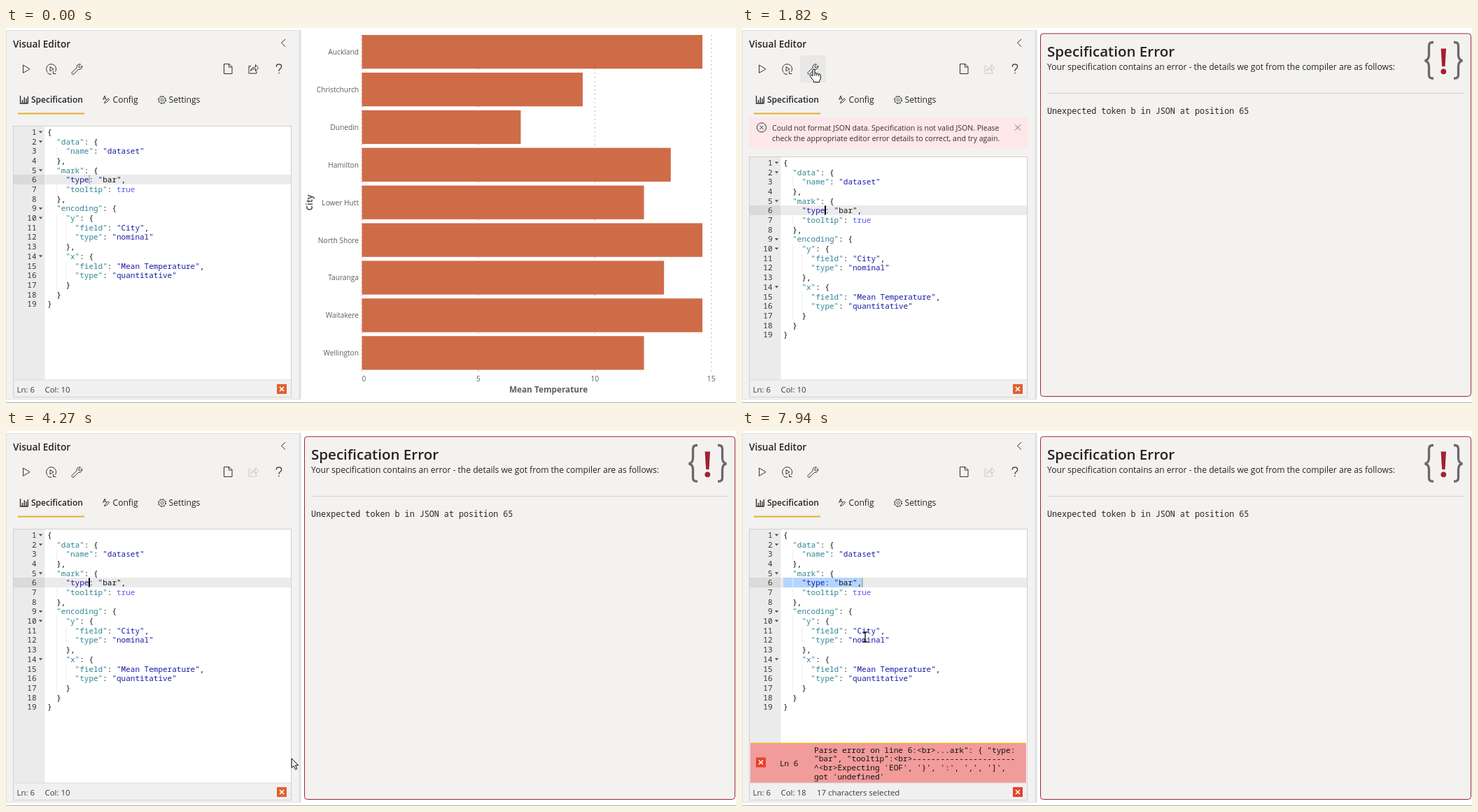
Write an HTML page that moves like this. It is 1043 px wide and 537 px high and loops after 7.99 s.

```html
<!DOCTYPE html>
<html lang="en">
<head>
<meta charset="utf-8">
<title>Visual Editor</title>
<style>
  html, body { margin: 0; width: 100%; height: 100%; overflow: hidden; background: #fff; }
  svg { display: block; width: 1043px; height: 537px; }
  text { font: 12.1px "Open Sans", "Noto Sans", sans-serif; fill: #252423; white-space: pre; }
  .semi { font-weight: 600; }
  .small { font-size: 10.55px; fill: #323130; }
  .status { font-size: 11.4px; fill: #3b3a39; }
  .axis { font-size: 10.2px; fill: #605e5c; }
  .axisTitle { font-size: 11.8px; font-weight: 700; fill: #605e5c; }
  .mono { font-family: "Noto Sans Mono", "DejaVu Sans Mono", monospace; font-size: 11px; fill: #111; }
  .key { fill: #318495; }
  .str { fill: #1a1aa6; }
  .const { fill: #585cf6; }
  .end { text-anchor: end; }
  .mid { text-anchor: middle; }
  .icon { fill: none; stroke: #323130; stroke-width: 1; }
</style>
</head>
<body>
<svg id="stage" viewBox="0 0 1043 537"></svg>
<script>
const LOOP = 7990, ROW = 13.68, CHAR = 6.6, CODE_X = 59, BANNER_SHIFT = 44;

const esc = s => s.replace(/&/g, '&amp;').replace(/</g, '&lt;');
const text = (x, y, s, cls = '', more = '') =>
  `<text x="${x}" y="${y}" class="${cls}" ${more}>${esc(s)}</text>`;
const rect = (x, y, w, h, fill, more = '') =>
  `<rect x="${x}" y="${y}" width="${w}" height="${h}" fill="${fill}" ${more}/>`;
const path = (d, more = 'class="icon"') => `<path d="${d}" ${more}/>`;
const group = (id, body) => `<g id="${id}">${body}</g>`;
const errorBox = (x, y, id = '') =>
  rect(x, y, 14, 14, '#e8402a', `id="${id}"`) +
  path(`M${x + 4} ${y + 4}l6 6m0-6l-6 6`, 'stroke="#fff" stroke-width="1.7"');

// Chart
const cities = [['Auckland', 14.62], ['Christchurch', 9.48], ['Dunedin', 6.82], ['Hamilton', 13.26],
  ['Lower Hutt', 12.11], ['North Shore', 14.62], ['Tauranga', 12.97], ['Waitakere', 14.62], ['Wellington', 12.11]];
const scaleX = v => 508.5 + v * 33.28;

function chart() {
  const grid = [0, 5, 10, 15].map(v =>
    path(`M${scaleX(v)} 10V494`, 'stroke="#b3b0ad" stroke-width="1.2" stroke-dasharray="1.5 4.5"') +
    text(v ? scaleX(v) : 511.5, 505.5, String(v), 'axis mid')).join('');
  const bars = cities.map(([name, v], i) => {
    const y = 10 + i * 53.9;
    return rect(508.5, y, scaleX(v) - 508.5, 48.3, '#cf6c48') + text(504, y + 28, name, 'axis end');
  }).join('');
  return grid + bars + text(775, 521.5, 'Mean Temperature', 'axisTitle mid') +
    text(0, 0, 'City', 'axisTitle mid', 'transform="translate(437.5 250) rotate(-90)"');
}

function errorPage() {
  const brace = 'M988 20.5h-1.5q-5 0-5 5v13q0 7.5-6 8.3q6 .8 6 8.3v12q0 5 5 5h1.5';
  const braceStyle = 'fill="none" stroke="#6b6967" stroke-width="3.3"';
  return rect(426.5, 8, 615, 519.5, '#f3f2f1', 'rx="4" stroke="#9c262c"') +
    text(436, 41, 'Specification Error', 'semi', 'style="font-size:20.55px"') +
    text(436, 60, 'Your specification contains an error - the details we got from the compiler are as follows:') +
    rect(436, 93, 596, 1, '#d2d0ce') +
    text(436, 123, 'Unexpected token b in JSON at position 65', 'mono', 'style="font-size:11.72px;fill:#252423"') +
    path(brace, braceStyle) +
    path(brace, braceStyle + ' transform="matrix(-1 0 0 1 2005 0)"') +
    path('M998.6 29.5h7.4l-1.5 25.5h-4.4z', 'fill="#a4202c"') +
    '<circle cx="1002.3" cy="62.3" r="3.9" fill="#a4202c"/>';
}

// Left panel
function toolbar() {
  const gear = '<circle cx="223" cy="103" r="5.6" class="icon" stroke-dasharray="2.2 2.2"/>' +
    '<circle cx="223" cy="103" r="4.6" class="icon" style="stroke-width:.8"/>' +
    '<circle cx="223" cy="103" r="2" class="icon" style="stroke-width:.8"/>';
  return text(10, 28, 'Visual Editor', 'semi', 'style="font-size:13.6px"') +
    path('M399 16l-5.5 5.3l5.5 5.3') +
    rect(83, 39, 37, 39, '#e9e8e7', 'id="hover"') +
    path('M24.5 53l9.5 5.7l-9.5 5.7z') +
    path('M59.5 63.5a7 7 0 1 1 11-1M71.5 65.5h-4v-4M59.5 64.8a7 7 0 0 0 5.5 1.4M63 55.5l5 3.2l-5 3.2z') +
    path('M94.5 63.3l6.7-6.5a4 4 0 0 1 5.3-4.8l-2.6 2.6l.3 1.7l1.7.3l2.6-2.6a4 4 0 0 1-4.9 5.2l-6.6 6.7a1.8 1.8 0 0 1-2.5-2.6z') +
    path('M311.5 51.5h7.5l4 4v10h-11.5zM318.5 51.5v4.5h4.5') +
    path('M350 54.5h-3v10.5h11v-3M349.5 61.5q1-5.5 7-5.5v-3.5l4 4.7l-4 4.7v-3.5q-4.5-.5-7 3.1z', 'class="icon" id="share"') +
    path('M386.2 55.5q0-3.6 3.7-3.6t3.7 3.4q0 2-1.9 3.2t-1.8 3.3M389.9 63.7v1.6', 'class="icon" style="stroke-width:1.3"') +
    path('M20.5 97v11h11M23.5 108v-5M26.3 108v-9M29 108v-7M31.3 108v-10', 'class="icon" style="stroke-width:1.4"') +
    text(36, 107, 'Specification', 'semi', 'style="font-size:12px"') +
    path('M138.5 103l2.5-6l2.3 5.5M139.5 101h3M140.5 107.5l1.2-2.6l4.5-4l1.5 1.6l-4.5 4.2z') +
    text(152.5, 107, 'Config') + gear + text(232.5, 107, 'Settings') +
    rect(17, 121.5, 95, 2, '#e8b02a');
}

function banner() {
  return rect(10, 128, 399, 43.5, '#fde7e9') +
    group('bannerText',
      '<circle cx="28" cy="142.5" r="6.6" class="icon"/>' + path('M25.4 139.9l5.2 5.2m0-5.2l-5.2 5.2') +
      text(43, 147, 'Could not format JSON data. Specification is not valid JSON. Please', 'small') +
      text(43, 162, 'check the appropriate editor error details to correct, and try again.', 'small') +
      path('M390 138.5l8 8m0-8l-8 8', 'stroke="#605e5c" stroke-width=".9"'));
}

const code = `{
  "data": {
    "name": "dataset"
  },
  "mark": {
    "type: "bar",
    "tooltip": true
  },
  "encoding": {
    "y": {
      "field": "City",
      "type": "nominal"
    },
    "x": {
      "field": "Mean Temperature",
      "type": "quantitative"
    }
  }
}`.split('\n');

const paint = line => line.includes('"type: ')
  ? line.replace('"type: "', '<tspan class="str">$&</tspan>')
  : line.replace(/"[^"]*"(?=:)|"[^"]*"|true/g, (s, at) => {
      const cls = s === 'true' ? 'const' : line[at + s.length] === ':' ? 'key' : 'str';
      return `<tspan class="${cls}">${s}</tspan>`;
    });

function codeLines() {
  const top = 210;
  let out = rect(11, top, 44, 14, '#dadada') + rect(55, top, 352, 14, '#ebebeb') +
    rect(CODE_X, top, 113, 14, '#b5d5ff', 'id="selection"');
  code.forEach((line, i) => {
    const y = 153 + i * ROW, indent = line.search(/\S/);
    out += text(43.5, y, String(i + 1), 'mono end', 'style="fill:#333"');
    if (line.endsWith('{')) out += path(`M46.8 ${y - 5.5}h5.4l-2.7 3.2z`, 'fill="#555"');
    for (let c = 2; c < indent; c += 2)
      out += rect(CODE_X + c * CHAR, y - 11, 1, ROW, '#eee');
    out += `<text x="${CODE_X}" y="${y}" class="mono">${paint(line)}</text>`;
  });
  return out + rect(118, top + 0.5, 2, 13, '#000', 'id="caret"');
}

function parsePanel() {
  const message = ['Parse error on line 6:<br>...ark": { "type:', '"bar", "tooltip":<br>' + '-'.repeat(22),
    "^<br>Expecting 'EOF', '}', ':', ',', ']',", "got 'undefined'"];
  return rect(12, 446.5, 394, 1.5, '#f0b429') + rect(12, 448, 394, 56, '#f29b9b') + errorBox(20, 467.5) +
    text(54, 479.5, 'Ln 6', 'mono') +
    message.map((s, i) => text(103, 460.7 + i * 12.7, s, 'mono', 'style="font-size:11.15px"')).join('');
}

const pointers = {
  arrow: path('M0 0v13.5l3.1-2.9l2.3 5.3l2.3-1l-2.3-5.1h4.2z', 'fill="#fff" stroke="#000"'),
  beam: path('M-3.5-7h2.5q1 0 1 1v12q0 1-1 1h-2.5M3.5-7h-2.5q-1 0-1 1M0 6q0 1 1 1h2.5', 'fill="none" stroke="#111" stroke-width="1.3"'),
  hand: path('M-1.5 1.5q1.5-2.6 3 0v5q1.5-1.2 2.8.3q1.5-.8 2.7.7q2.3-.6 2.7 1.5v4.5q0 2-1.5 3.5v2h-8.2v-1.8l-5-6.3q-.8-1.9 1-2.3q1.3 0 2.5 1.8z' +
    'M1.5 6.5v3.5M4.3 7v3M7 8v2.3', 'fill="#fff" stroke="#000" stroke-linejoin="round"')
};

const stage = document.getElementById('stage');
stage.innerHTML =
  group('chart', chart()) + group('errorPage', errorPage()) +
  rect(0, 3, 421.5, 529, '#e1e0df') + rect(1, 4, 417.5, 527, '#f3f2f1') +
  rect(0, 536, 1043, 1, '#b0afae') + toolbar() + group('banner', banner()) +
  rect(10.5, 140.5, 397, 388, '#fff', 'stroke="#d0cfce" id="frame"') +
  rect(11, 141, 44.5, 363, '#ebebeb', 'id="gutter"') +
  group('lines', codeLines()) + group('panel', parsePanel()) +
  rect(11, 504, 396, 24, '#f0f0f0') + rect(11, 503.5, 396, 1, '#dcdcdc') +
  text(15.5, 521.5, 'Ln: 6', 'status') + text(55.5, 521.5, 'Col: 10', 'status', 'id="col"') +
  text(107, 521.5, '17 characters selected', 'status', 'id="count"') + errorBox(387, 510, 'badge') +
  group('pointer', Object.entries(pointers).map(([k, v]) => group(k, v)).join(''));

const $ = {};
stage.querySelectorAll('[id]').forEach(el => $[el.id] = el);
const show = (el, on) => el.style.display = on ? '' : 'none';
const set = (el, attrs) => Object.entries(attrs).forEach(([k, v]) => el.setAttribute(k, v));

// Pointer stops: time, x, y, sideways bend on the way there
const stops = [[500, 300, 548], [920, 102.5, 58.5], [2430, 102.5, 58.5], [3210, 394, 141], [3370, 394, 141],
  [3560, 397, 147], [3740, 397, 147], [4430, 397, 519, 27], [4740, 397, 519], [5350, 378, 490],
  [5480, 378, 490], [5900, 326, 387], [7520, 326, 387], [7620, 326, 411, 15], [7780, 326, 411], [7940, 176, 295]];

function pointerAt(t) {
  const i = stops.findIndex(s => s[0] > t);
  if (i < 1) return (i ? stops[stops.length - 1] : stops[0]).slice(1);
  const [t0, x0, y0] = stops[i - 1], [t1, x1, y1, bend = 0] = stops[i];
  const u = (t - t0) / (t1 - t0), e = u * u * (3 - 2 * u);
  return [x0 + (x1 - x0) * e + bend * Math.sin(Math.PI * e), y0 + (y1 - y0) * e];
}

function draw(t) {
  const warned = t >= 1180 && t < 3370, failed = t >= 1820, parsed = t >= 4560, selected = t >= 5480;
  const shift = warned ? BANNER_SHIFT : 0;
  const [x, y] = pointerAt(t);

  show($.chart, !failed);
  show($.errorPage, failed);
  set($.share, { style: failed ? 'stroke:#c8c6c4' : '' });
  show($.banner, warned);
  set($.bannerText, { opacity: Math.min(1, Math.max(0, (t - 1180) / 330)) });
  set($.frame, { y: 140.5 + shift, height: 388 - shift });
  set($.gutter, { y: 141 + shift, height: 363 - shift });
  set($.lines, { transform: `translate(0 ${shift})` });

  show($.panel, parsed);
  show($.selection, selected);
  show($.count, selected);
  $.col.textContent = selected ? 'Col: 18' : 'Col: 10';
  set($.badge, { fill: parsed ? '#e8402a' : '#de6130' });
  const focused = t >= 1180 && t < 2700 || t >= 3370 && t < 4350;
  set($.caret, { x: selected ? 171.5 : focused ? 118 : 118.5, width: focused ? 2 : 1, fill: focused ? '#000' : '#8a8a8a' });

  const onTool = x > 83 && x < 120 && y > 39 && y < 78;
  const onClose = warned && x > 380 && x < 408 && y > 128 && y < 171;
  const onPanel = parsed && x < 406 && y > 447 && y < 504;
  const onCode = x > 56 && x < 407 && y > 141 + shift && y < (parsed ? 446 : 504);
  const shape = onTool || onClose || onPanel ? 'hand' : onCode ? 'beam' : 'arrow';
  show($.hover, onTool);
  Object.keys(pointers).forEach(k => show($[k], k === shape));
  set($.pointer, { transform: `translate(${x} ${y})` });
}

const start = performance.now();
function tick() {
  draw((performance.now() - start) % LOOP);
  requestAnimationFrame(tick);
}
tick();
</script>
</body>
</html>
```
